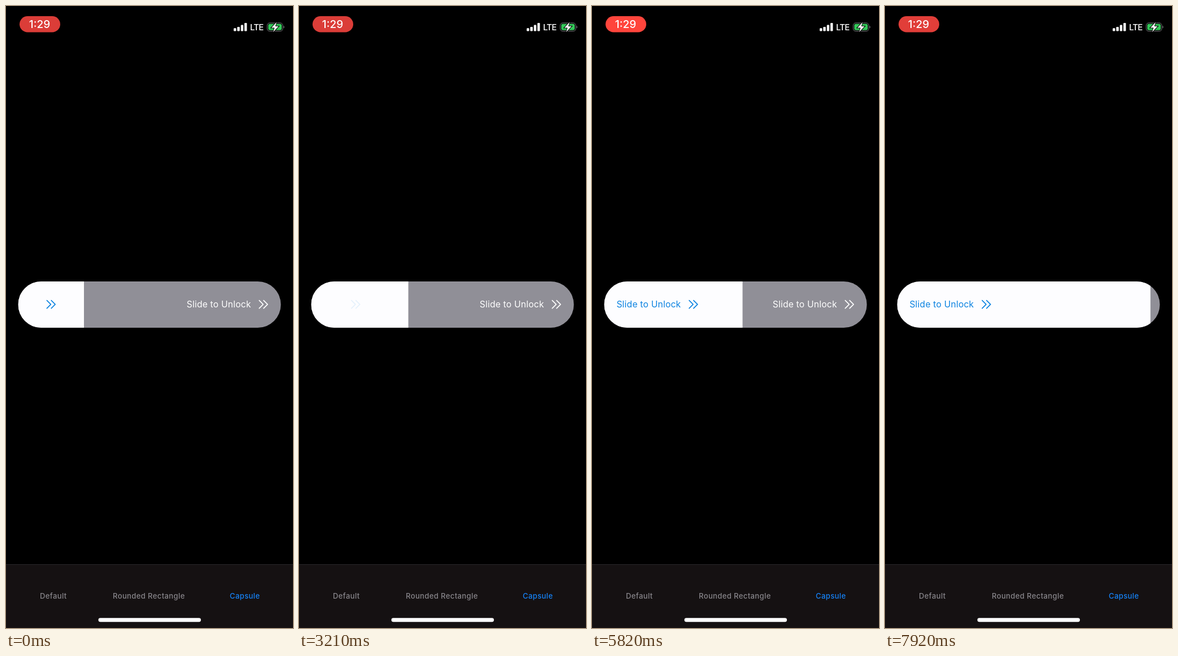
These frames come from a looping animation (508x1102 px, 8 s). An HTML page:

```html
<!DOCTYPE html>
<html lang="en">
<head>
<meta charset="utf-8">
<title>Slide to Unlock</title>
<style>
html, body { margin: 0; width: 100%; height: 100%; overflow: hidden; background: #000; }
svg { display: block; width: 508px; height: 1102px; font-family: Inter, "Open Sans", sans-serif; }
.label { font-size: 15.6px; letter-spacing: .22px; }
.tab { font-size: 13px; font-weight: 500; letter-spacing: .4px; fill: #88868b; }
.chevrons { fill: none; stroke-width: 1.6; stroke-linecap: round; stroke-linejoin: round; }
</style>
</head>
<body>
<svg viewBox="0 0 508 1102">
  <defs>
    <clipPath id="capsule"><rect x="21.5" y="488" width="465" height="82" rx="41"/></clipPath>
    <clipPath id="filled"><rect id="clip" x="21.5" y="488" height="82"/></clipPath>
    <path id="chevrons" class="chevrons" d="M-7 -7l7 7-7 7M.8 -7l7 7-7 7"/>
  </defs>

  <!-- Status bar -->
  <rect id="pill" x="24" y="18" width="72" height="28.5" rx="14.2"/>
  <text x="59.5" y="39" text-anchor="middle" font-size="19" font-weight="500" fill="#fff">1:29</text>
  <g fill="#fff">
    <rect x="403" y="39.2" width="4.4" height="5.3" rx="1.3"/>
    <rect x="409.3" y="37" width="4.4" height="7.5" rx="1.3"/>
    <rect x="415.7" y="33.5" width="4.4" height="11" rx="1.3"/>
    <rect x="422" y="30" width="4.4" height="14.5" rx="1.3"/>
    <text x="432" y="43.4" font-size="15" font-weight="500" letter-spacing="-.8">LTE</text>
  </g>
  <rect x="462.3" y="30" width="27.6" height="14.6" rx="4.4" fill="none" stroke="#77777a"/>
  <rect x="464.2" y="31.8" width="23.8" height="11" rx="2.8" fill="#34c759"/>
  <path d="M491.3 35v4.6q1.4-.8 1.4-2.3t-1.4-2.3z" fill="#77777a"/>
  <path d="M479 28.5l-9.2 10h5.6l-2.5 7.7 9.5-10.2h-5.7z" fill="#fff" stroke="#000" stroke-width="2" paint-order="stroke"/>

  <!-- Slider -->
  <g clip-path="url(#capsule)">
    <rect x="21" y="488" width="466" height="82" fill="#908f97"/>
    <text class="label" x="319.7" y="534.4" fill="#fff">Slide to Unlock</text>
    <use href="#chevrons" x="455.2" y="528.6" stroke="#fff"/>
    <g clip-path="url(#filled)">
      <rect x="21" y="488" width="466" height="82" fill="#fdfdff"/>
      <use id="icon" href="#chevrons" y="528.6" stroke="#0a82e0"/>
      <g id="title">
        <text class="label" x="43.4" y="534.4" fill="#0a82e0">Slide to Unlock</text>
        <use href="#chevrons" x="179" y="528.6" stroke="#0a82e0"/>
      </g>
    </g>
  </g>

  <!-- Tab bar -->
  <rect y="989" width="508" height="113" fill="#151112"/>
  <rect y="989" width="508" height="1" fill="#29282a"/>
  <text class="tab" x="60" y="1050.4">Default</text>
  <text class="tab" x="189" y="1050.4">Rounded Rectangle</text>
  <text class="tab" x="396" y="1050.4" style="fill:#1583f8">Capsule</text>
  <rect x="163.5" y="1084.3" width="181.5" height="6.9" rx="3.45" fill="#fff"/>
</svg>
<script>
const LOOP = 8000, LEFT = 21.5, MIN = 138, MAX = 486.5, SWITCH = 179;
const OUT = 31, IN_START = 70, IN_TIME = 70;
const PULSE = 1120;

// [time, right edge of the filled part]
const drag = [
  [0, MIN], [60, MIN], [900, MAX], [1510, 156], [1590, MIN], [1660, MIN],
  [2350, MAX], [3000, MIN], [3080, MIN], [3210, 193], [3720, MAX],
  [4250, MIN], [4325, MIN], [4380, 145], [4930, 467], [5440, MIN], [5520, MIN],
  [5820, 266], [6230, 480], [6740, MIN], [6890, MIN], [7780, MAX],
  [7920, 470], [LOOP, 445]
];

const $ = id => document.getElementById(id);
const clamp = v => Math.max(0, Math.min(1, v));
const smooth = v => { v = clamp(v); return v * v * (3 - 2 * v); };

const slope = i => (drag[i + 1][1] - drag[i][1]) / (drag[i + 1][0] - drag[i][0]);

// Zero at turning points, harmonic mean of the neighbours elsewhere
function tangent(i) {
  if (i === 0 || i === drag.length - 1) return 0;
  const a = slope(i - 1), b = slope(i);
  return a * b > 0 ? 2 * a * b / (a + b) : 0;
}

function edgeAt(t) {
  let i = 0;
  while (i < drag.length - 2 && t >= drag[i + 1][0]) i++;
  const [t0, x0] = drag[i], [t1, x1] = drag[i + 1];
  const h = t1 - t0, u = (t - t0) / h, v = 1 - u;
  return x0 * v * v * (1 + 2 * u) + x1 * u * u * (3 - 2 * u)
    + h * u * v * (v * tangent(i) - u * tangent(i + 1));
}

// Time since the edge last crossed the label threshold
function switchAge(t) {
  const wide = edgeAt(t) > SWITCH, limit = IN_START + IN_TIME;
  for (let age = 0; age < limit && age <= t; age++)
    if (edgeAt(t - age) > SWITCH !== wide) return age;
  return limit;
}

function pillColor(t) {
  const p = (t / PULSE + 0.03) % 1;
  const glow = p < 0.4 ? smooth((p - 0.07) / 0.12) : 1 - smooth((p - 0.4) / 0.45);
  const mix = (a, b) => Math.round(a + (b - a) * glow);
  return `rgb(${mix(219, 255)},${mix(61, 69)},${mix(56, 60)})`;
}

function draw(t) {
  const x = edgeAt(t), wide = x > SWITCH, age = switchAge(t);
  const shown = clamp((age - IN_START) / IN_TIME);
  const hidden = clamp(1 - age / OUT);
  $("clip").setAttribute("width", x - LEFT);
  $("icon").setAttribute("x", (LEFT + Math.min(x, SWITCH)) / 2 - 0.4);
  $("icon").setAttribute("opacity", wide ? hidden : shown);
  $("title").setAttribute("opacity", wide ? shown : hidden);
  $("pill").setAttribute("fill", pillColor(t));
}

const start = performance.now();
function frame() {
  draw((performance.now() - start) % LOOP);
  requestAnimationFrame(frame);
}
frame();
</script>
</body>
</html>
```
